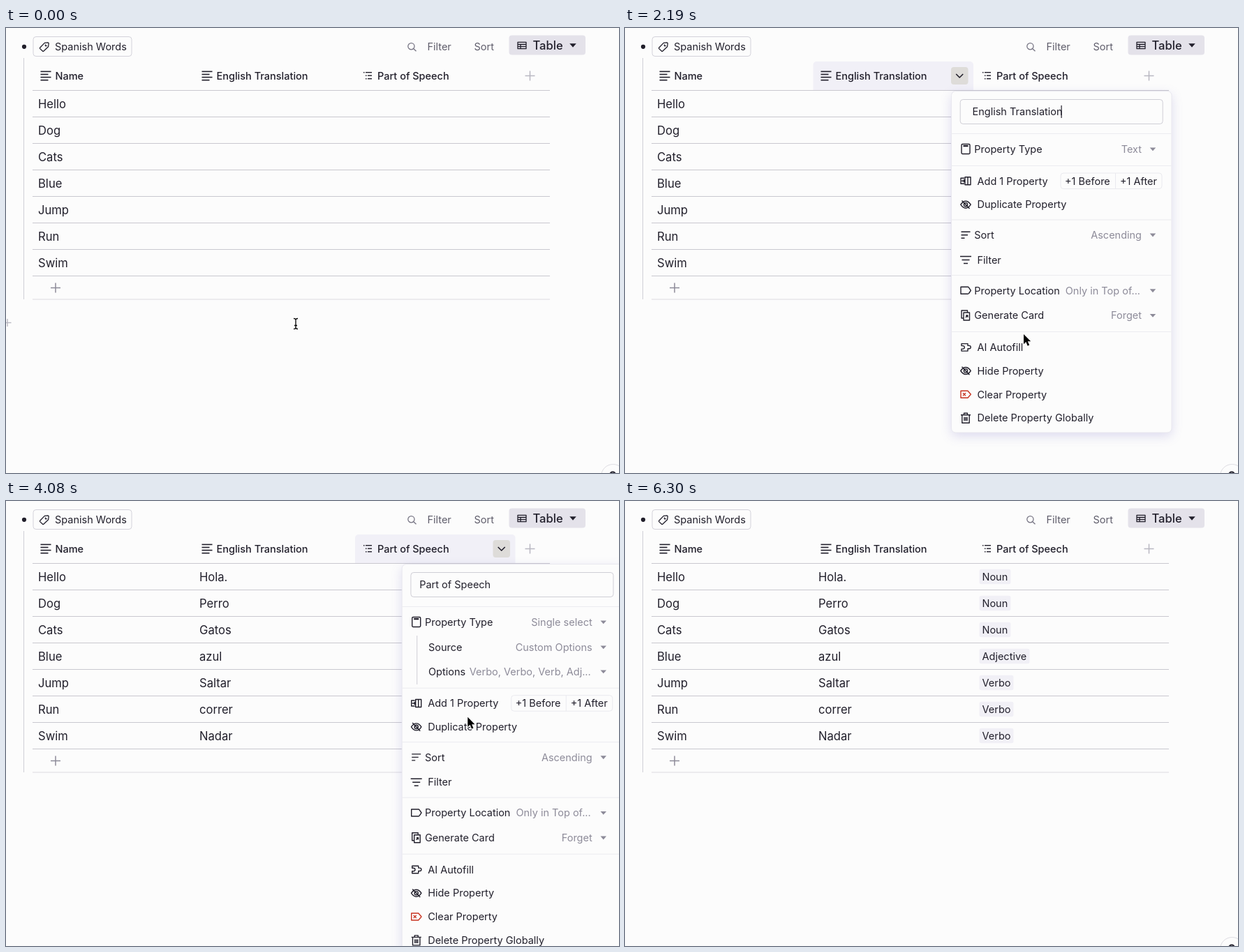
Animation of 878 by 638 pixels, one loop 6660 ms. Source, as an HTML page with a canvas:

```html
<!DOCTYPE html>
<html lang="en">
<head>
<meta charset="utf-8">
<title>Vocabulary table</title>
<style>
html, body { margin: 0; width: 100%; height: 100%; overflow: hidden; background: #fcfcfc; }
canvas { display: block; width: 878px; height: 638px; }
</style>
</head>
<body>
<canvas id="stage" width="878" height="638"></canvas>
<script>
const ctx = document.getElementById('stage').getContext('2d');
const LOOP = 6660, STEP = 30;
const BG = '#fcfcfc', INK = '#211f2b', GRAY = '#8d8b99', LINE = '#c9c8cf', PALE = '#b9b8c2';

// [word, translation, shown at, tag, tag width, tagged at]
const ROWS = [
  ['Hello', 'Hola.', 3120, 'Noun', 45, 5340],
  ['Dog', 'Perro', 3210, 'Noun', 45, 5430],
  ['Cats', 'Gatos', 2850, 'Noun', 45, 5490],
  ['Blue', 'azul', 2760, 'Adjective', 72, 5640],
  ['Jump', 'Saltar', 2910, 'Verbo', 49, 5700],
  ['Run', 'correr', 2970, 'Verbo', 49, 5760],
  ['Swim', 'Nadar', 3300, 'Verbo', 49, 5850]
];

// Pointer tip: [time, x, y]
const PATH = [
  [0, 415, 424], [30, 415, 424], [210, 476, 121], [690, 476, 121], [1020, 484, 117],
  [1230, 481, 70], [1620, 478, 67], [2190, 571, 439], [2340, 563, 453], [2490, 563, 455],
  [2790, 650, 190], [3030, 720, 115], [3330, 711, 70], [3660, 709, 66], [3780, 705, 72],
  [4320, 630, 480], [4470, 621, 515], [4710, 621, 519], [4980, 621, 519],
  [5430, 640, 560], [5970, 690, 660], [LOOP, 690, 660]
];

const MENUS = [
  { open: 1560, close: 2490, column: 1, dx: 0, dy: 0, title: 'English Translation', inset: 18, type: 'Text', focus: true },
  { open: 3570, close: 4980, column: 2, dx: 99.7, dy: 70.7, title: 'Part of Speech', inset: 13, type: 'Single select' }
];
const COLUMNS = [38, 269, 499.5, 730];

const ICONS = {
  tag: 'M-6.3 1.2L.3-5.6 5-6.2 6.2-5 5.6-.3-1.2 6.3Q-2 6.8-2.7 6L-6.3 2.6Q-6.8 2-6.3 1.2ZM2.2-3.2A1 1 0 1 0 3.3-2.2',
  calc: 'M-4.6-7H4.6Q6-7 6-5.6V5.6Q6 7 4.6 7H-4.6Q-6 7-6 5.6V-5.6Q-6-7-4.6-7ZM-3.5-4.8H3.5M-3.5-4H3.5',
  insert: 'M-1-5.5H7V5.5H-1ZM-1-5.5V5.5M3-5.5V5.5M-2-4H-7V4H-2M-6 0H-1M-3-2L-1 0-3 2',
  hidden: 'M-7.2 0Q-4-5 0-5T7.2 0Q4 5 0 5T-7.2 0ZM2.6 0A2.6 2.6 0 1 1-2.6 0 2.6 2.6 0 1 1 2.6 0M-5.5-5.8L5.5 5.8',
  sort: 'M-6.5-4.5H6.5M-6.5 0H3M-6.5 4.5H-1.5',
  filter: 'M-8-5H8M-5.5 0H5.5M-3 5H3',
  label: 'M-7-5H3Q4-5 4.5-4.2L7.3 0 4.5 4.2Q4 5 3 5H-7Z',
  card: 'M-3-4H5.5V7H-3ZM-3 4H-6V-7H2.5V-4M0 3L2.8-.5M.2 0H2.8V2.8',
  puzzle: 'M-6-5H3V-2.2H5A2 2 0 1 1 5 2.2H3V5.5H-6V2.5H-4A2 2 0 1 0-4-2H-6Z',
  clear: 'M-7-5H3L7.3 0 3 5H-7ZM-4-2L0 2M0-2L-4 2',
  trash: 'M-7-4.5H7M-5.2-4.5V7H5.2V-4.5M-2.5-4.5V-7H2.5V-4.5M-2-1.5V4M0-1.5V4M2-1.5V4',
  chevron: 'M-5-2.5L0 2.5 5-2.5',
  search: 'M3.5-1A4.6 4.6 0 1 1-5.7-1 4.6 4.6 0 1 1 3.5-1M2.3 2.4L6 6',
  table: 'M-6-4.7H6V4.7H-6ZM-6-1.5H6M-6 1.6H6M-2-1.5V4.7'
};
for (const key in ICONS) ICONS[key] = new Path2D(ICONS[key]);

const ARROW = new Path2D('M0 0V14.2L3.3 11 5.7 16.7 8.2 15.6 5.8 10.3H10.2Z');
const HAND = new Path2D('M-2 1V10L-4 8Q-7 7-6 9.5L-1.5 16H7L9 11V6Q8 4 6.5 5.5 5.5 3.5 4 5 3 3 1.8 4.5V1Q0-2-2 1Z');
const HAND_LINES = new Path2D('M1 9V13M3.5 9V13M6 9V13');

const clamp = v => Math.max(0, Math.min(1, v));

function text(str, x, cy, size = 14.5, color = INK, weight = 400, align = 'left') {
  ctx.font = `${weight} ${size}px Inter, sans-serif`;
  ctx.fillStyle = color;
  ctx.textAlign = align;
  ctx.fillText(str, x, cy + size * 0.364);
}

function rect(x, y, w, h, color) {
  ctx.fillStyle = color;
  ctx.fillRect(x, y, w, h);
}

function box(x, y, w, h, r, fill, stroke) {
  ctx.beginPath();
  ctx.roundRect(x, y, w, h, r);
  if (fill) { ctx.fillStyle = fill; ctx.fill(); }
  if (stroke) { ctx.strokeStyle = stroke; ctx.lineWidth = 1; ctx.stroke(); }
}

function disc(x, y, r, fill) {
  ctx.beginPath();
  ctx.arc(x, y, r, 0, Math.PI * 2);
  ctx.fillStyle = fill;
  ctx.fill();
}

function icon(name, x, y, color = INK, width = 1.4) {
  ctx.save();
  ctx.translate(x, y);
  ctx.strokeStyle = color;
  ctx.lineWidth = width;
  ctx.lineJoin = 'round';
  ctx.stroke(ICONS[name]);
  ctx.restore();
}

function plus(x, y, size, color, width = 1.5) {
  rect(x - size / 2, y - width / 2, size, width, color);
  rect(x - width / 2, y - size / 2, width, size, color);
}

function caret(x, y, w, color) {
  ctx.beginPath();
  ctx.moveTo(x - w / 2, y - w / 4);
  ctx.lineTo(x + w / 2, y - w / 4);
  ctx.lineTo(x, y + w / 3);
  ctx.fillStyle = color;
  ctx.fill();
}

function textIcon(x) {
  [15, 11, 15, 11].forEach((w, i) => rect(x, 61.6 + i * 4.1, w, 1.6, INK));
}

function listIcon(x) {
  for (let i = 0; i < 3; i++) {
    const indent = i ? 3 : 0;
    rect(x + indent, 63 + i * 4.5, 1.5, 1.5, INK);
    rect(x + indent + 3, 63 + i * 4.5, 9 - indent, 1.4, INK);
  }
}

function pointerAt(t) {
  const i = Math.max(1, PATH.findIndex(p => p[0] > t));
  const [t0, x0, y0] = PATH[i - 1], [t1, x1, y1] = PATH[i];
  const p = clamp((t - t0) / (t1 - t0)), e = p * p * (3 - 2 * p);
  return { x: x0 + (x1 - x0) * e, y: y0 + (y1 - y0) * e };
}

function toolbar() {
  disc(26, 26.8, 3.1, INK);
  box(39, 12.5, 141, 28, 4, BG, '#d3d2da');
  icon('tag', 55, 27, INK, 1.3);
  text('Spanish Words', 70, 26.8);
  icon('search', 581.5, 27.3, '#777584', 1.3);
  text('Filter', 603.5, 26.8, 14.5, '#5f5d6b');
  text('Sort', 670.5, 26.8, 14.5, '#5f5d6b');
  box(720.5, 10.5, 109.5, 28, 4, '#e4e2ea');
  icon('table', 739, 25, INK, 1.3);
  text('Table', 754.5, 24.8, 16.6, INK, 500);
  caret(812, 24.5, 9.5, INK);
}

function header(active) {
  if (active) {
    const x = COLUMNS[active] + 0.5;
    box(x, 48, 229.5, 42, [5, 5, 0, 0], '#f1f0f7');
    box(x + 197.5, 56, 24.5, 25, 4, '#dedcd9');
    icon('chevron', x + 209.7, 68.5, INK, 1.6);
  }
  textIcon(49.5);
  text('Name', 70.5, 68.5, 14.5, INK, 500);
  textIcon(280.5);
  text('English Translation', 301.5, 68.5, 14.5, INK, 500);
  listIcon(512);
  text('Part of Speech', 532, 68.5, 14.5, INK, 500);
  plus(750.5, 68.5, 14, PALE);
}

function table(t, hover) {
  rect(25, 43, 1, 346, '#d0cfd6');
  for (let i = 0; i < 8; i++) rect(38, 89 + i * 38, 741, 1, LINE);
  rect(38, 388.5, 741, 1, '#dddce2');

  ROWS.forEach(([word, translation, shownAt, tag, tagWidth, taggedAt], i) => {
    const cy = 108.7 + i * 38;
    text(word, 46, cy, 16.6);
    if (t >= shownAt) text(translation, 277, cy, 16.6);
    if (t >= taggedAt) {
      box(507.5, cy - 11, tagWidth, 21.5, 3, '#f1f0f6');
      text(tag, 511.5, cy);
    }
  });
  plus(71, 372.5, 14, GRAY);

  if (hover) {
    const y = 90.5 + hover.row * 38, x = COLUMNS[hover.column] + 0.5;
    box(x, y, COLUMNS[hover.column + 1] - x, 36.5, 0, null, '#b3b1bd');
    rect(20, y + 5, 12, 27, BG);
    for (let k = 0; k < 6; k++) disc(23 + (k % 2) * 6, y + 12.5 + (k >> 1) * 5.8, 1.8, '#b7b5c0');
    plus(2, y + 18.5, 9, '#d3d2dc', 1.3);
  }
}

function scrollbar(t) {
  if ((t >= 120 && t < 1620) || (t >= 2640 && t < 3750))
    box(-8, 394, 835.5, 8.3, 4.1, '#c1c1ca');
}

function helpBubble() {
  box(852.5, 625.5, 34, 34, 17, BG, '#dedde3');
  ctx.beginPath();
  ctx.arc(869, 640.5, 4, Math.PI, 0);
  ctx.strokeStyle = INK;
  ctx.lineWidth = 2;
  ctx.stroke();
}

function separator(y) {
  rect(467.5, y, 315, 1, '#ececf0');
}

function item(name, label, y, value, x = 504.5, color = INK) {
  if (name) icon(name, 488, y, color, 1.4);
  text(label, x, y);
  if (value) {
    text(value, value.endsWith('...') ? 738 : 740, y, 14.5, GRAY, 400, 'right');
    caret(756, y, 8.5, GRAY);
  }
}

function menu(m, t, pointer) {
  const p = clamp((t - m.open) / 120), ease = 1 - (1 - p) ** 4;
  const scale = 0.95 + 0.05 * ease;
  const hoverAI = aiHovered(m, pointer);
  ctx.save();
  ctx.globalAlpha = clamp(p * 1.6);
  ctx.translate(m.dx, 0);
  ctx.translate(625, 335);
  ctx.scale(scale, scale);
  ctx.translate(-625, -335);

  const height = 489.5 + m.dy;
  ctx.save();
  ctx.shadowColor = 'rgba(110, 100, 190, .22)';
  ctx.shadowBlur = 16;
  ctx.shadowOffsetY = 5;
  box(467.5, 90.5, 315.5, height, 6, BG);
  ctx.restore();
  box(467.5, 90.5, 315.5, height, 6, BG, '#e9e8ef');

  box(480.2, 102.5, 290, 35, 4, BG, '#cfced6');
  text(m.title, 479.5 + m.inset, 120.2);
  if (m.focus) rect(624.5, 111, 1.2, 18, INK);

  separator(151);
  item('calc', 'Property Type', 173.5, m.type, 500.3);
  if (m.dy) {
    rect(488.5, 193, 1, 70, '#cfced6');
    item(null, 'Source', 209.5, 'Custom Options', 505.3);
    item(null, 'Options', 244.5, 'Verbo, Verbo, Verb, Adj...', 505.3);
  }

  ctx.translate(0, m.dy);
  separator(197);
  item('insert', 'Add 1 Property', 219.3);
  box(624, 208, 145, 22.5, 4, BG, '#eaeaef');
  rect(702, 208, 1, 22.5, '#eaeaef');
  text('+1 Before', 630, 219.3);
  text('+1 After', 709, 219.3);
  item('hidden', 'Duplicate Property', 253.2);
  separator(274.5);
  item('sort', 'Sort', 296.7, 'Ascending', 500.3);
  item('filter', 'Filter', 332.5);
  separator(354);
  item('label', 'Property Location', 376.3, 'Only in Top of...', 500.3);
  item('card', 'Generate Card', 412, 'Forget', 500.3);
  separator(435);
  if (hoverAI) box(471.5, 441.5, 306.5, 32, 5, '#ebebec');
  item('puzzle', 'AI Autofill', 457.6);
  item('hidden', 'Hide Property', 491.5);
  item('clear', 'Clear Property', 525.3, null, 504.5, '#c8321f');
  item('trash', 'Delete Property Globally', 559.2);
  ctx.restore();
}

function aiHovered(m, p) {
  return p.x > 471 + m.dx && p.y >= 441.5 + m.dy && p.y < 473.5 + m.dy;
}

function drawPointer(kind, { x, y }) {
  ctx.save();
  ctx.translate(x, y);
  ctx.lineJoin = 'round';
  if (kind === 'beam') {
    const beam = new Path2D('M-3-7.5Q0-7.5 0-5.5 0-7.5 3-7.5M0-5.5V5.5M-3 7.5Q0 7.5 0 5.5 0 7.5 3 7.5M-2 2.5H2');
    ctx.strokeStyle = '#fff';
    ctx.lineWidth = 3;
    ctx.stroke(beam);
    ctx.strokeStyle = '#000';
    ctx.lineWidth = 1.3;
    ctx.stroke(beam);
  } else if (kind === 'hand') {
    ctx.fillStyle = '#fff';
    ctx.fill(HAND);
    ctx.strokeStyle = '#000';
    ctx.lineWidth = 1.2;
    ctx.stroke(HAND);
    ctx.lineWidth = 1;
    ctx.stroke(HAND_LINES);
  } else {
    ctx.strokeStyle = '#fff';
    ctx.lineWidth = 2;
    ctx.stroke(ARROW);
    ctx.fillStyle = '#000';
    ctx.fill(ARROW);
  }
  ctx.restore();
}

function render(t) {
  const pointer = pointerAt(t), { x, y } = pointer;
  const current = MENUS.find(m => t >= m.open && t < m.close);
  const column = [0, 1, 2].find(i => x >= COLUMNS[i] && x < COLUMNS[i + 1]);
  const inRows = !current && y >= 90 && y < 356 && column !== undefined;
  const inHeader = y >= 48 && y < 90;
  const hover = inRows ? { row: Math.floor((y - 90) / 38), column } : null;

  rect(0, 0, 878, 638, BG);
  toolbar();
  header(current ? current.column : inHeader ? column : 0);
  table(t, hover);
  scrollbar(t);
  if (!current && y > 403 && y < 441) plus(2, 422.5, 11, PALE, 1.4);
  helpBubble();
  if (current) menu(current, t, pointer);

  const overAI = current && aiHovered(current, pointer);
  drawPointer(overAI ? 'hand' : t < 1110 ? 'beam' : 'arrow', pointer);
}

const start = performance.now();
function tick() {
  const t = (performance.now() - start) % LOOP;
  render(Math.floor(t / STEP) * STEP);
  requestAnimationFrame(tick);
}
tick();
</script>
</body>
</html>
```
